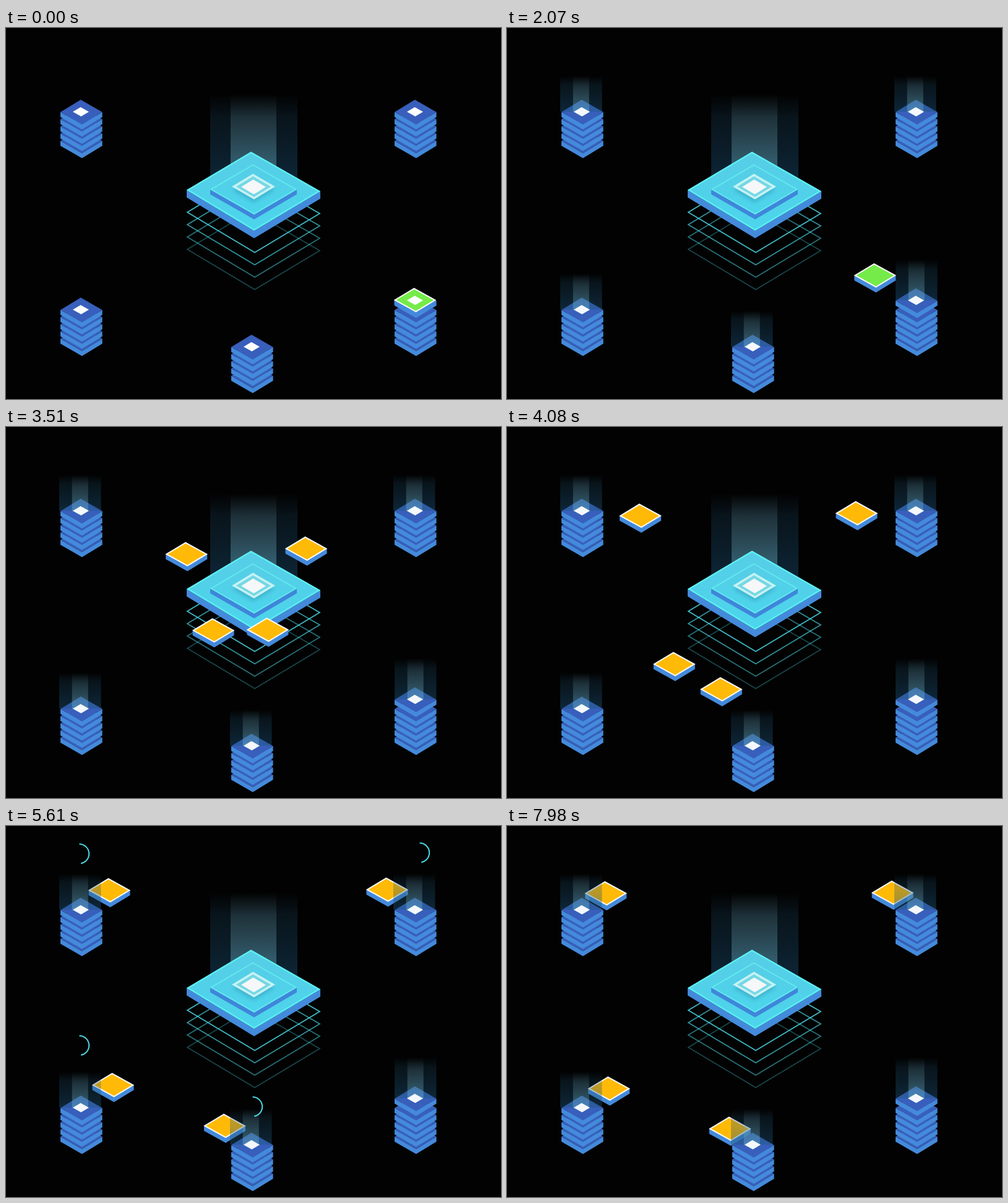
An HTML page that plays this animation: 800 px wide and 600 px high, repeating every 8 s.

```html
<!DOCTYPE html>
<html lang="en">
<head>
<meta charset="utf-8">
<title>Block network</title>
<style>
  html, body { margin: 0; width: 100%; height: 100%; overflow: hidden; background: #020202; }
  svg { display: block; width: 800px; height: 600px; }
</style>
</head>
<body>
<svg id="stage" viewBox="0 0 800 600" xmlns="http://www.w3.org/2000/svg">
  <defs>
    <linearGradient id="wide" x1="0" y1="0" x2="0" y2="1">
      <stop offset="0" stop-color="#1c4a66" stop-opacity="0"/>
      <stop offset=".25" stop-color="#1c4a66" stop-opacity=".26"/>
      <stop offset="1" stop-color="#1c5680" stop-opacity=".44"/>
    </linearGradient>
    <linearGradient id="core" x1="0" y1="0" x2="0" y2="1">
      <stop offset="0" stop-color="#78a8b4" stop-opacity="0"/>
      <stop offset=".3" stop-color="#78a8b4" stop-opacity=".2"/>
      <stop offset="1" stop-color="#6cc0d6" stop-opacity=".44"/>
    </linearGradient>
    <linearGradient id="deck" x1="0" y1="0" x2="0" y2="1">
      <stop offset="0" stop-color="#57cde6"/>
      <stop offset="1" stop-color="#4bd5ec"/>
    </linearGradient>
    <filter id="soft"><feGaussianBlur stdDeviation="3"/></filter>
  </defs>
</svg>
<script>
const NS = 'http://www.w3.org/2000/svg';
const LOOP = 8000;
const SIDE = '#448adb', FACE = '#385fbb', GREEN = '#75eb49', ORANGE = '#ffba08', CYAN = '#4bd8e4';
const stage = document.getElementById('stage');

function add(parent, tag, attrs) {
  const el = document.createElementNS(NS, tag);
  for (const key in attrs) el.setAttribute(key, attrs[key]);
  parent.appendChild(el);
  return el;
}
const group = (parent = stage) => add(parent, 'g', {});
const poly = (parent, pts, attrs) => add(parent, 'polygon', { points: pts.join(' '), ...attrs });

// top, right, bottom and left corners of a slightly skewed rhombus
const rhombus = (x, y, w, h, skew = 0) => [[x - skew, y - h], [x + w, y], [x + skew, y + h], [x - w, y]];

// the two visible walls beneath a rhombus
function walls(parent, [, r, b, l], depth, fill = SIDE) {
  const down = ([x, y]) => [x, y + depth];
  poly(parent, [l, b, r, down(r), down(b), down(l)], { fill });
}

function slab(parent, x, y) {
  const top = rhombus(x, y, 33.8, 20, 1);
  walls(parent, top, 8);
  poly(parent, top, { fill: FACE });
}

function tile(parent, fill) {
  const g = group(parent);
  walls(g, rhombus(0, 0, 33.5, 19.5, 1.5), 8);
  poly(g, rhombus(0, 0, 32.3, 18.6, 1.5), { fill, stroke: '#fff', 'stroke-width': 2 });
  return g;
}

// Central platform
function buildCore() {
  const g = group();
  add(g, 'rect', { x: 330, y: 108, width: 141, height: 145, fill: 'url(#wide)' });
  add(g, 'rect', { x: 363, y: 108, width: 74, height: 130, fill: 'url(#core)' });
  [.32, .52, .68, .88].forEach((opacity, i) => {
    const y = 360 - i * 20;
    poly(g, [[396, y - 64], [507, y], [402, y + 63], [293, y - 2]],
      { fill: 'none', stroke: CYAN, 'stroke-width': 1.7, opacity });
  });

  const base = [[396, 200], [508, 264], [401, 328], [292, 262]];
  walls(g, base, 12);
  poly(g, base, { fill: 'url(#deck)' });
  poly(g, [[396, 201.5], [506, 264], [401, 326.5], [294, 262]],
    { fill: 'none', stroke: '#5cf0f1', 'stroke-width': 2.2 });

  const step = rhombus(400, 261, 70, 40.5, 1);
  walls(g, step, 8, '#3f86da');
  poly(g, step, { fill: 'url(#deck)' });
  poly(g, rhombus(400, 261, 68.5, 39.5, 1), { fill: 'none', stroke: '#62e8ee', 'stroke-width': 2 });

  poly(g, rhombus(400, 262, 34, 20), { fill: '#2b8fb0', opacity: .45, filter: 'url(#soft)' });
  poly(g, rhombus(400, 256.5, 31.5, 18.7, .8),
    { fill: '#74d8e4', stroke: '#c6f2f4', 'stroke-width': 3.6 });
  poly(g, rhombus(400, 257, 20, 12, .5), { fill: '#f5f7f9' });
}

const towers = [
  { x: 121, y: 135.5 }, { x: 661, y: 135.5 }, { x: 121, y: 455.5 },
  { x: 397, y: 515.5 }, { x: 661, y: 440.5, tall: true }
];

function buildTower({ x, y, tall }) {
  const first = tall ? y + 15 : y;
  for (let i = 4; i >= 0; i--) slab(stage, x + .8, first + i * 11.6 + .5);
  if (tall) slab(stage, x + .8, y + .5);
}

function buildBeam({ x, y, tall }) {
  const left = x - (tall ? 33 : 35), top = y - (tall ? 66 : 58);
  const wide = add(stage, 'rect', { x: left, y: top, width: 67.5, height: y - top, fill: 'url(#wide)' });
  const mid = left + 33.7;
  const core = poly(stage, [[mid - 13, top], [mid + 13, top], [mid + 13, y], [mid, y + 7], [mid - 13, y]],
    { fill: 'url(#core)' });
  return { wide, core };
}

buildCore();
towers.forEach(buildTower);

const green = tile(stage, GREEN);
// start, stop beside a tower, landing on that tower
const routes = [
  { from: [308, 219], stop: [167, 104], land: [121, 135], ring: [118.5, 45] },
  { from: [468, 209], stop: [616, 103], land: [661, 135], ring: [668.5, 43.3] },
  { from: [455.5, 316], stop: [173, 419], land: [121, 455], ring: [118.5, 355] },
  { from: [332.7, 308.7], stop: [353.5, 485], land: [397, 515], ring: [398.5, 454] }
];
routes.forEach(r => { r.tile = tile(stage, ORANGE); });

const beams = towers.map(buildBeam);
const gems = towers.map(({ x, y }) => poly(stage, rhombus(x, y, 13, 7.6, .4), { fill: '#fff' }));

const RADIUS = 15.7, ROUND = 2 * Math.PI * RADIUS;
routes.forEach(r => {
  const [x, y] = r.ring;
  r.arc = add(stage, 'circle', {
    cx: x, cy: y, r: RADIUS, fill: 'none', stroke: CYAN, 'stroke-width': 2,
    transform: `rotate(-90 ${x} ${y})`
  });
});

const ramp = (t, start, span) => Math.min(1, Math.max(0, (t - start) / span));
const ease = (t, start, span) => (1 - Math.cos(Math.PI * ramp(t, start, span))) / 2;
const mix = (a, b, k) => a + (b - a) * k;
const between = (p, q, k) => [mix(p[0], q[0], k), mix(p[1], q[1], k)];

function place(el, [x, y], opacity) {
  el.setAttribute('transform', `translate(${x.toFixed(2)} ${y.toFixed(2)})`);
  el.setAttribute('opacity', opacity);
}

function draw(t) {
  const glow = ramp(t, 0, 270);
  const bright = mix(glow * .6, 1, ease(t, 1050, 780));
  beams.forEach(({ wide, core }) => {
    wide.setAttribute('opacity', glow);
    core.setAttribute('opacity', bright);
  });
  gems.forEach(gem => gem.setAttribute('opacity', 1 - .06 * bright));

  place(green, between([661, 440], [470, 325], ease(t, 1430, 1600)), 1 - ramp(t, 2980, 180));

  const go = ease(t, 3180, 1500), dock = ease(t, 7590, 1500);
  const shown = ramp(t, 3060, 180);
  const drawn = ease(t, 4890, 1500), faded = ease(t, 6600, 950);
  routes.forEach(r => {
    const spot = between(between(r.from, r.stop, go), r.land, dock);
    place(r.tile, spot, shown);
    r.arc.setAttribute('stroke-dasharray', `${drawn * ROUND} ${ROUND}`);
    r.arc.setAttribute('opacity', drawn > 0 ? 1 - faded : 0);
  });
}

const began = performance.now();
function tick() {
  draw((performance.now() - began) % LOOP);
  requestAnimationFrame(tick);
}
draw(0);
requestAnimationFrame(tick);
</script>
</body>
</html>
```
